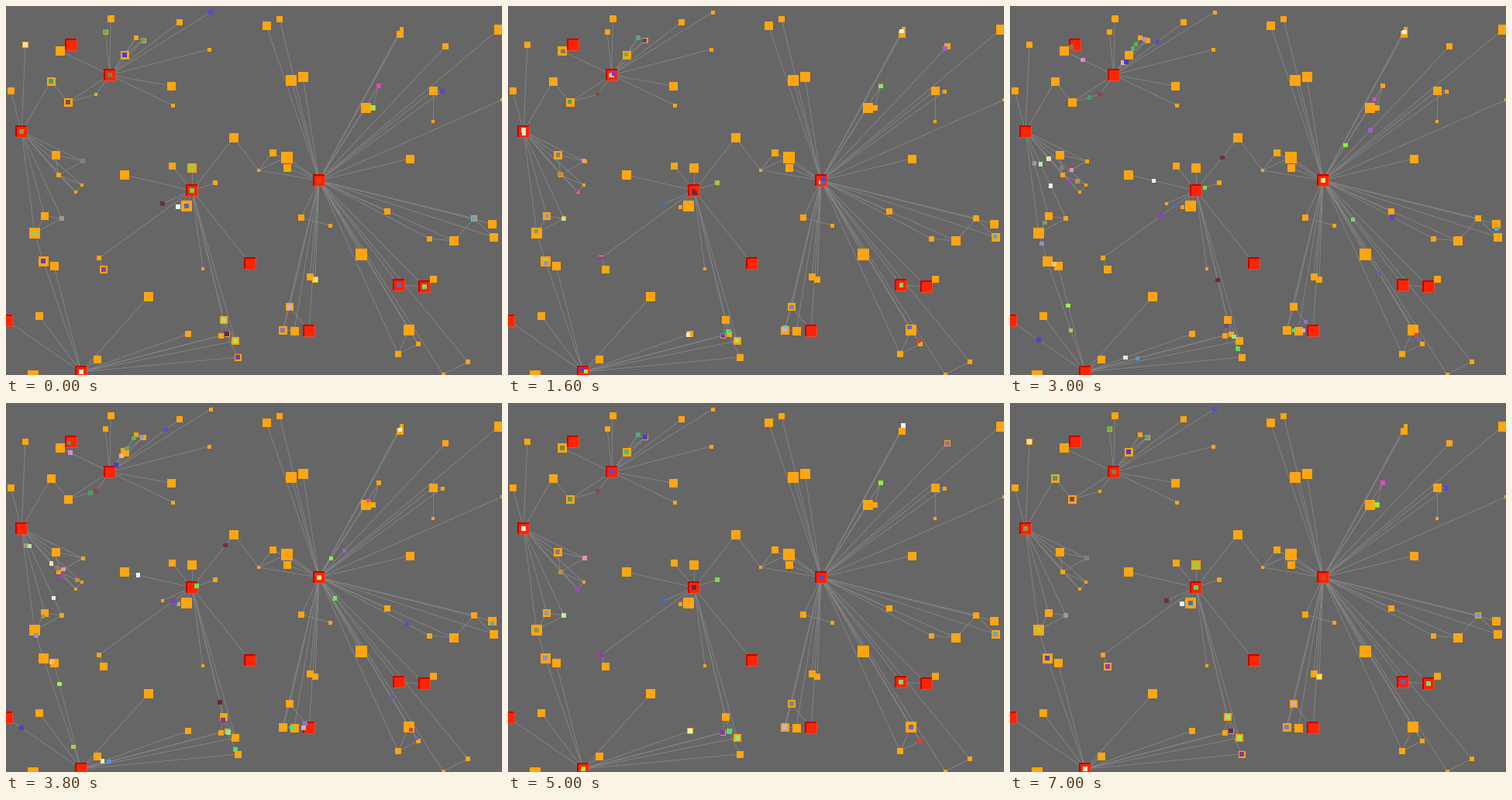
Write a matplotlib script that moves like this. It is 640 px wide and 476 px high and loops after 7100 ms.

```python
import numpy as np
import matplotlib.pyplot as plt
from matplotlib.animation import FuncAnimation
from matplotlib.collections import LineCollection
from matplotlib.patches import Rectangle

W, H, DPI = 640, 476, 100
FRAMES, STEP = 71, 100
RED = 0  # size mark of the red server squares

# Each cluster: (x, y, size) with its hub first.
clusters = {
    "a": [(134, 89, RED), (135, 16, 9), (128, 33, 7), (168, 41, 6), (177, 44, 7),
          (153, 63, 11), (70, 58, 12), (224, 21, 8), (264, 8, 5), (262, 56, 5),
          (213, 103, 11), (215, 128, 5), (116, 114, 4), (80, 124, 11),
          (58, 97, 11), (84, 50, RED)],
    "b": [(20, 162, RED), (6, 109, 9), (25, 50, 8), (64, 192, 11), (99, 200, 5),
          (68, 218, 6), (98, 231, 4), (90, 240, 4), (50, 271, 10), (72, 274, 6),
          (37, 293, 14)],
    "c": [(97, 472, RED), (48, 329, 13), (62, 335, 11), (43, 400, 10),
          (118, 456, 10), (184, 375, 12), (235, 423, 8), (277, 425, 7),
          (285, 423, 7), (296, 432, 10), (299, 453, 9), (1, 406, RED),
          (35, 477, 14), (281, 405, 10)],
    "d": [(240, 238, RED), (153, 218, 12), (214, 206, 9), (240, 209, 12),
          (270, 228, 6), (202, 255, 4), (222, 259, 5), (233, 258, 14),
          (294, 170, 12), (120, 325, 6), (254, 339, 4), (315, 332, RED),
          (126, 340, 10), (326, 212, 4)],
    "n": [(404, 225, RED), (336, 25, 11), (353, 17, 8), (368, 96, 14),
          (383, 91, 13), (508, 36, 9), (510, 29, 5), (567, 52, 8), (636, 30, 13),
          (551, 109, 11), (563, 110, 5), (551, 149, 4), (640, 121, 4),
          (481, 103, 6), (464, 131, 13), (473, 131, 7), (521, 197, 11),
          (344, 189, 9), (362, 195, 15), (363, 209, 10)],
    "s": [(404, 225, RED), (381, 273, 8), (418, 283, 5), (458, 320, 15),
          (392, 349, 9), (399, 353, 8), (366, 388, 10), (357, 418, 11),
          (372, 419, 11), (391, 419, RED), (507, 360, RED), (540, 362, RED),
          (551, 352, 9), (520, 418, 14), (532, 436, 6), (506, 449, 8),
          (596, 459, 6), (564, 475, 5), (492, 265, 8), (604, 274, 8),
          (627, 281, 11), (629, 298, 11), (578, 303, 12), (546, 300, 7)],
}
nodes = {f"{key}{i}": node for key, group in clusters.items()
         for i, node in enumerate(group)}

# Nodes without a line to their own hub.
no_spoke = "a14 a15 c12 c13 d12 d13 n11 n15 s2 s12".split()
links = """a12-a13 a13-a14 b0-a14 b3-b4 b3-b5 b4-b5 b5-b6 b5-b7 b6-b7 b8-b9
b9-b10 b8-b10 b10-c1 d9-d12 d8-d13 d0-c8 d0-c9 d0-c13 d13-n0 d13-n17 d13-n18
n9-n11 n9-n10 n13-n15 n5-n6 s1-s2 s10-s11 s11-s12 s13-s15 s13-s14 s14-s15
s16-s17 s19-s22 s19-s21 s22-s23 s6-s9 s6-s7 s7-s8 c7-c13 c8-c10 c9-c13
a3-a4 a3-a5 a4-a5""".split()

# Each packet: home, first stop, second stop, colour.
packets = [
    ("a0", "a0", "a6", "#d890d0"), ("a0", "a13", "a5", "#f0b090"),
    ("a0", "a8", "a7", "#5a48d0"), ("a6", "a0", "a15", "#7d7d55"),
    ("a5", "a2", "a3", "#5ab848"), ("a3", "a5", "a4", "#a890d0"),
    ("a3", "a4", "a5", "#58a878"), ("a4", "a5", "a0", "#5038c8"),
    ("a12", "a13", "a12", "#8a4a48"), ("a13", "a14", "a12", "#4f9a68"),
    ("b0", "b2", "b5", "#eee0b0"), ("b0", "b10", "b9", "#f0f0f0"),
    ("b4", "b0", "b5", "#f090a8"), ("b5", "b0", "b6", "#c09040"),
    ("b7", "b0", "b5", "#a048b8"), ("b3", "b4", "b5", "#8a8070"),
    ("b10", "b0", "b8", "#8a9a50"), ("b8", "b9", "b0", "#a09890"),
    ("b9", "b10", "b0", "#b8e8a8"),
    ("c1", "c1", "c2", "#f0c080"), ("c1", "b10", "c0", "#a8d040"),
    ("c1", "c0", "b10", "#9890c0"), ("c0", "c1", "c11", "#5040c8"),
    ("c6", "c0", "c0", "#d8f8c0"), ("c0", "c9", "c2", "#98f050"),
    ("c7", "c13", "c0", "#6090d8"), ("c7", "c10", "c13", "#8038a8"),
    ("c9", "c13", "c8", "#98e888"),
    ("d4", "d3", "d0", "#70e050"), ("d5", "d7", "d6", "#4870b0"),
    ("d0", "d6", "d1", "#e0fff0"), ("d0", "d5", "d8", "#6a3048"),
    ("d9", "d12", "d0", "#9038c0"), ("d0", "c8", "c8", "#6a2838"),
    ("c8", "d0", "c10", "#50e060"),
    ("n13", "n13", "n14", "#e048c0"), ("n13", "n15", "n0", "#88f040"),
    ("n6", "n0", "n5", "#fff0e0"), ("n7", "n0", "n0", "#a060c8"),
    ("s0", "s5", "s0", "#e8e880"), ("s0", "s10", "s13", "#6860a8"),
    ("s0", "n10", "s23", "#5a48c8"), ("s13", "s0", "s14", "#6868c0"),
    ("s10", "s11", "s0", "#80d870"), ("s7", "s0", "s8", "#50e078"),
    ("s7", "s6", "s9", "#d0a8e0"), ("s6", "s7", "s9", "#8878b8"),
    ("s21", "s19", "s20", "#58a8d0"), ("s14", "s0", "s13", "#e04030"),
]


def spots(column):
    return np.array([nodes[p[column]][:2] for p in packets], float)


def side(px):
    """Scatter area of a square with the given side in pixels."""
    return (px * 72 / DPI) ** 2


def box(x, y, w, h, color):
    ax.add_patch(Rectangle((x, y), w, h, fc=color, lw=0, zorder=2))


def draw_server(x, y):
    box(x - 8, y - 8, 16, 16, "#d85040")
    box(x - 8, y - 8, 15, 15, "#c40000")
    box(x - 6, y - 6, 13, 13, "#ff2400")


fig = plt.figure(figsize=(W / DPI, H / DPI), dpi=DPI, facecolor="#666666")
ax = fig.add_axes([0, 0, 1, 1])
ax.set(xlim=(0, W), ylim=(H, 0))
ax.axis("off")

edges = [(f"{key}0", f"{key}{i}") for key, group in clusters.items()
         for i in range(1, len(group)) if f"{key}{i}" not in no_spoke]
edges += [tuple(link.split("-")) for link in links]
ax.add_collection(LineCollection(
    [(nodes[p][:2], nodes[q][:2]) for p, q in edges],
    colors="#888888", linewidths=0.6, zorder=1))

for x, y, size in nodes.values():
    if size == RED:
        draw_server(x, y)
    else:
        box(x - size / 2, y - size / 2, size, size, "#ffa510")

home, first, second = spots(0), spots(1), spots(2)
dots = ax.scatter(home[:, 0], home[:, 1], marker="s", s=side(5.5), linewidths=0,
                  c=[p[3] for p in packets], zorder=3)

# Distance from home over time: above 0 to the first stop, below to the second.
times = [0, 540, 1620, 2300, 3420, 3575, 4700, 5600, 6710, 7100]
reach = [1, 1, 0, 0, -1, -1, 0, 0, 1, 1]


def update(i):
    r = np.interp(i * STEP, times, reach)
    goal = first if r > 0 else second
    dots.set_offsets(home + (goal - home) * abs(r))
    return (dots,)


anim = FuncAnimation(fig, update, frames=FRAMES, interval=STEP, repeat=True,
                     repeat_delay=0, blit=False)
plt.show()
```
